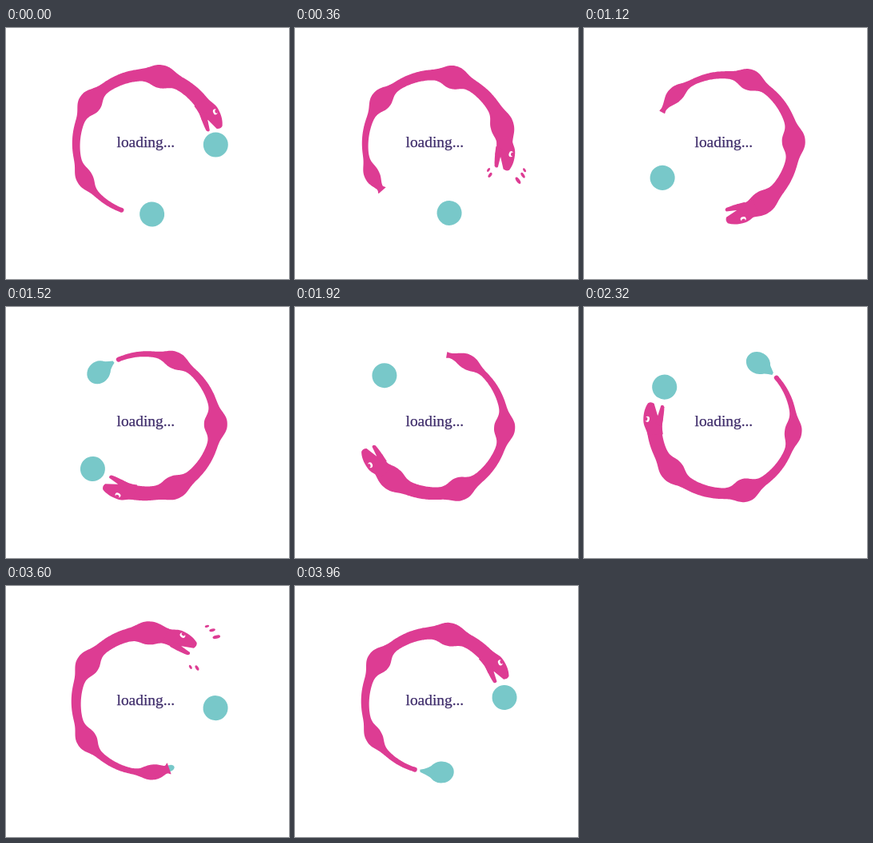
These frames come from a looping animation (354 by 314 pixels, 4 s). An HTML page with a canvas:

```html
<!DOCTYPE html>
<html lang="en">
<head>
<meta charset="utf-8">
<title>Loading</title>
<style>
  html, body { margin: 0; width: 100%; height: 100%; overflow: hidden; background: #fff; }
  canvas { display: block; width: 354px; height: 314px; }
</style>
</head>
<body>
<canvas id="stage" width="354" height="314"></canvas>
<script>
const ctx = document.getElementById('stage').getContext('2d');
const PINK = '#dd3c93', TEAL = '#78c8c9', INK = '#3f2d6b';
const CX = 175, CY = 146, R = 87.3;
const LOOP = 4000, STEP = 800, FRAME = 40, SLOT = 72;
const SPEED = SLOT / STEP; // degrees per ms

const rad = deg => deg * Math.PI / 180;
const bell = (x, width, power) => Math.exp(-(Math.abs(x / width) ** power));

// Eased 0 to 1 between two times, and an eased rise and fall.
function ease(from, to, t) {
  const x = Math.min(1, Math.max(0, (t - from) / (to - from)));
  return x * x * (3 - 2 * x);
}
const pulse = (from, full, hold, to, t) => ease(from, full, t) * (1 - ease(hold, to, t));

// Angles in degrees, clockwise. An egg's age counts in ms from the bite.
const foodAngle = age => 13 - 17.3 * ease(-700, -100, age) + 4.3 * ease(-40, 0, age) - 12 * ease(0, 200, age);
const foodSize = age => 15.5 - 7 * ease(100, 220, age);
const bulgeAngle = age => .008 * age - 11.8 - 6.5 * (1 - ease(400, 480, age)) + 6 * ease(2760, 2880, age);
const bulgeSize = age => 14.5 * ease(80, 220, age) - 5 * ease(1500, 2700, age) - 10 * ease(2880, 3120, age);
const tailAngle = p => SPEED * p - 251.5 + 2 * Math.cos(2 * Math.PI * p / STEP);
const neckAngle = p => SPEED * p - 32 - 2.5 * pulse(720, 760, 760, 800, p);

// Local frame on the ring: x runs clockwise along it, y points to the centre.
function onRing(angle, draw) {
  ctx.save();
  ctx.rotate(rad(angle));
  ctx.translate(R, 0);
  ctx.rotate(Math.PI / 2);
  draw();
  ctx.restore();
}

function ellipse(x, y, rx, ry, turn = 0) {
  ctx.beginPath();
  ctx.ellipse(x, y, rx, ry, rad(turn), 0, 2 * Math.PI);
  ctx.fill();
}

function drawFood(p) {
  ctx.fillStyle = TEAL;
  for (const slot of [0, 1]) {
    const age = p - STEP * slot, size = foodSize(age);
    if (age > 220) continue;
    onRing(SLOT * slot + foodAngle(age), () => ellipse(0, 0, size, size));
  }
}

function drawEgg(p) {
  if (p < 400) return;
  const centre = -218 + 15 * ease(400, 800, p);
  const length = 6 + 9.5 * ease(400, 640, p);
  const width = 4 + 9.5 * ease(440, 720, p);
  const reach = rad(tailAngle(p) - 4.5 - centre);
  const tipX = R * Math.sin(reach), tipY = R * (1 - Math.cos(reach));
  ctx.fillStyle = TEAL;
  onRing(centre, () => {
    ellipse(0, 0, length, width);
    if (tipX <= length) return;
    ctx.beginPath();
    ctx.moveTo(length * .55, -width * .83);
    ctx.quadraticCurveTo(length * .95, -width * .3, tipX, tipY - 1.5);
    ctx.lineTo(tipX, tipY + 1.5);
    ctx.quadraticCurveTo(length * .95, width * .45, length * .55, width * .83);
    ctx.fill();
  });
}

function drawBody(p) {
  const mouth = SPEED * p - 9, tail = tailAngle(p), end = neckAngle(p) + 2;
  const flare = 4 * pulse(280, 400, 480, 620, p);
  const bulges = [0, 1, 2, 3].map(i => ({
    angle: bulgeAngle(p + STEP * i) - SLOT * i,
    size: bulgeSize(p + STEP * i)
  }));
  const halfWidth = angle => {
    const base = 10 - .03 * (mouth - angle);
    let extra = flare * bell(angle - tail, 1.8, 2);
    for (const b of bulges) extra += Math.max(0, b.size - base) * bell(angle - b.angle, 10, 2.5);
    return base + extra;
  };
  const outer = [], inner = [], count = 260;
  for (let i = 0; i <= count; i++) {
    const angle = tail + (end - tail) * i / count;
    const h = halfWidth(angle), c = Math.cos(rad(angle)), s = Math.sin(rad(angle));
    outer.push([(R + h) * c, (R + h) * s]);
    inner.unshift([(R - h) * c, (R - h) * s]);
  }
  ctx.fillStyle = PINK;
  ctx.beginPath();
  for (const [x, y] of [...outer, ...inner]) ctx.lineTo(x, y);
  ctx.fill();
  if (flare < 1) onRing(tail, () => ellipse(0, 0, 3, 3));
}

function drawHead(p) {
  const gape = 22 * pulse(0, 80, 80, 180, p) - 7 * pulse(180, 240, 420, 480, p);
  onRing(neckAngle(p), () => {
    ctx.scale(1, 1 + .15 * pulse(0, 120, 200, 320, p));
    ctx.fillStyle = PINK;

    // Skull and upper jaw
    ctx.beginPath();
    ctx.moveTo(-9, -8.5);
    ctx.bezierCurveTo(-1, -10, 3, -13.5, 10, -13);
    ctx.bezierCurveTo(19, -12.5, 26, -10, 31, -6);
    ctx.quadraticCurveTo(33, -2, 30, 1.5);
    ctx.lineTo(15, 5);
    ctx.lineTo(12, 12);
    ctx.quadraticCurveTo(2, 9, -9, 10.5);
    ctx.fill();

    // Lower jaw
    ctx.save();
    ctx.translate(13, 6);
    ctx.rotate(rad(gape));
    ctx.beginPath();
    ctx.moveTo(-8, -4);
    ctx.lineTo(2, -.5);
    ctx.lineTo(14, 4);
    ctx.quadraticCurveTo(15.5, 7, 12, 8);
    ctx.quadraticCurveTo(4, 7.5, -12, 3.5);
    ctx.fill();
    ctx.restore();

    ctx.fillStyle = '#fff';
    ellipse(11, -8, 3.6, 2.7, 15);
    ctx.fillStyle = PINK;
    ellipse(11.3, -9.6, 2.4, 1.8, 15);
  });
}

// Droplets flying off both sides of the jaws after each chomp.
function drawDrops(p) {
  ctx.fillStyle = PINK;
  for (const [start, life] of [[200, 40], [360, 120]]) {
    if (p < start || p > start + life) continue;
    const flight = (p - start - 40) / 80;
    onRing(SPEED * p - 32, () => {
      for (const [side, count] of [[-1, 3], [1, 2]])
        for (let i = 0; i < count; i++) {
          const x = 35 + 8 * i + (8 + 3 * i) * flight;
          const y = side * (15 + 5 * count - 2 * i * i + 10 * flight);
          ellipse(x, y, 2.8 + .35 * count * i, 1.5 + .3 * i, 35 * side);
        }
    });
  }
}

function draw(time) {
  const t = Math.floor((time % LOOP) / FRAME) * FRAME;
  const p = t % STEP;
  ctx.fillStyle = '#fff';
  ctx.fillRect(0, 0, 354, 314);
  ctx.save();
  ctx.translate(CX, CY);
  ctx.rotate(rad(SLOT * Math.floor(t / STEP)));
  for (const part of [drawFood, drawEgg, drawBody, drawHead, drawDrops]) part(p);
  ctx.restore();

  ctx.fillStyle = ctx.strokeStyle = INK;
  ctx.lineWidth = .25;
  ctx.font = '19.4px "Liberation Serif", serif';
  ctx.fillText('loading...', 138.5, 149);
  ctx.strokeText('loading...', 138.5, 149);
}

let start;
function tick(now) {
  start ??= now;
  draw(now - start);
  requestAnimationFrame(tick);
}
draw(0);
requestAnimationFrame(tick);
</script>
</body>
</html>
```
